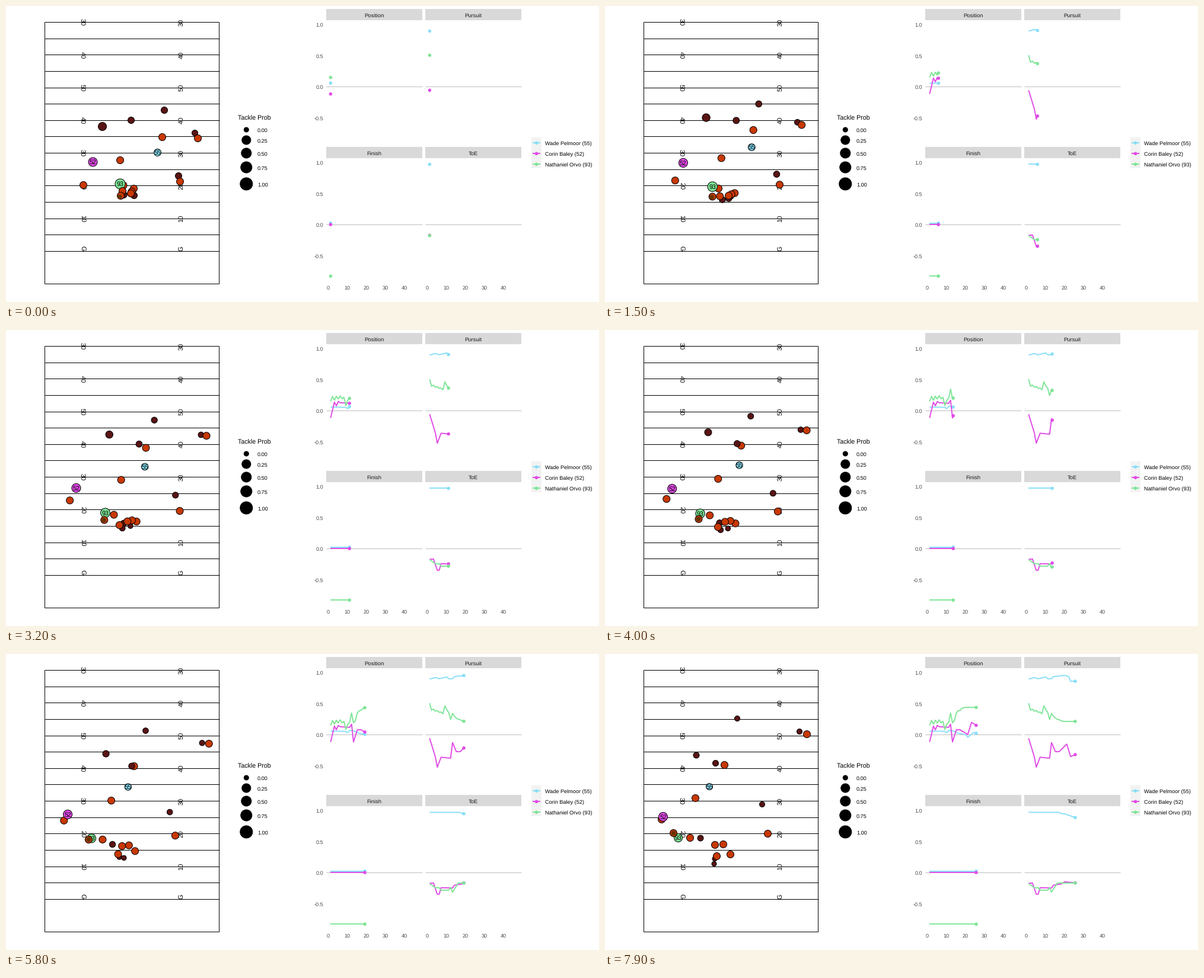
A matplotlib script for the animation above (8 s loop, 1000 by 500 pixels).

```python
import numpy as np
import matplotlib.pyplot as plt
from matplotlib.animation import FuncAnimation
from matplotlib.patches import Circle, Rectangle

W, H, DPI = 1000, 500, 100
FRAMES, INTERVAL = 80, 100
PT = 72 / DPI
plt.rcParams.update({"font.family": "Liberation Sans", "text.hinting": "none"})

BLUE, PINK, GREEN = "#87dff7", "#e04ae6", "#7ee596"
MAROON, ORANGE, BALL = "#5a1414", "#c83803", "#663300"

fig = plt.figure(figsize=(W / DPI, H / DPI), dpi=DPI, facecolor="white")
ax = fig.add_axes([0, 0, 1, 1])
ax.set(xlim=(0, W), ylim=(H, 0))
ax.axis("off")


def text(x, y, s, size=9.2, ha="left", color="black", z=2):
    """Text whose capitals are centred on y."""
    return ax.text(x, y + 0.36 * size, s, fontsize=size * PT, ha=ha,
                   va="baseline", color=color, zorder=z)


def line(xs, ys, color="black", width=1.0, z=1):
    return ax.plot(xs, ys, color=color, lw=width * PT, zorder=z,
                   solid_capstyle="butt", solid_joinstyle="round")[0]


def box(x, y, w, h, color):
    ax.add_patch(Rectangle((x, y), w, h, fc=color, ec="none", zorder=0))


def disc(x, y, d, color, edge="black", z=3):
    return ax.add_patch(Circle((x, y), (d - 1) / 2, fc=color, ec=edge,
                               lw=PT, zorder=z))


# ---- field: a line every five yards, a number every ten ----
LEFT, RIGHT, TOP, GAP = 65, 359, 27, 27.63
ax.add_patch(Rectangle((LEFT, TOP), RIGHT - LEFT, 16 * GAP, fc="none",
                       ec="black", lw=PT, zorder=1))
for k in range(1, 15):
    y = round(TOP + GAP * k)
    line([LEFT, RIGHT + 1], [y, y])
for k, mark in enumerate(["30", "40", "50", "40", "30", "20", "10", "G"]):
    y = TOP + 2 * GAP * k - (5 if mark == "G" else 0)
    for x, turn in ((129, -90), (295.5, 90)):
        ax.text(x, y + 0.5, mark, fontsize=11 * PT, rotation=turn,
                ha="center", va="center", zorder=1)

# ---- size legend ----
text(391, 189.5, "Tackle Prob", 10.6)
for k, (y, d) in enumerate([(209, 9), (226.5, 16), (248.5, 18),
                            (272.5, 20), (300.5, 22)]):
    disc(405.3, y, d, "black")
    text(424, y + 1, f"{k / 4:.2f}")

# ---- chart panels ----
UNIT_X, UNIT_Y = 3.216, 105.2
PANELS = {"Position": (540, 5), "Pursuit": (707, 5),
          "Finish": (540, 238), "ToE": (707, 238)}

for name, (px, py) in PANELS.items():
    box(px, py, 162, 19, "#d9d9d9")
    text(px + 81, py + 10.5, name, 9.4, "center", "#1a1a1a")
    zero = py + 131
    line([px, px + 162], [zero, zero], "#bebebe")
    if px == 540:
        for v in (1, 0.5, 0, -0.5):
            text(535, zero + 1 - v * UNIT_Y, f"{v:.1f}", 9.2, "right",
                 "#4d4d4d")
    if py == 238:
        for v in range(0, 50, 10):
            text(px + 3.5 + v * UNIT_X, 476, str(v), 9.2, "center", "#4d4d4d")

# ---- player legend ----
box(886, 222, 17, 52, "#f2f2f2")
for k, (color, name) in enumerate([(BLUE, "Wade Pelmoor (55)"),
                                   (PINK, "Corin Baley (52)"),
                                   (GREEN, "Nathaniel Orvo (93)")]):
    y = 231 + 18 * k
    line([888, 901], [y, y], color, 2)
    disc(894.5, y + 0.3, 5.5, color, color)
    text(909, y + 1, name)

# ---- revealed curves ----
STEPS = np.arange(1, 27)
curves = []


def curve(panel, color, *knots, wobble=0):
    """Straight runs between (step, value) knots plus a fading zigzag."""
    px, py = PANELS[panel]
    values = np.interp(STEPS, *zip(*knots))
    values += wobble * (-1.0) ** STEPS * np.exp(-STEPS / 8)
    xs = px + 7.4 + UNIT_X * (STEPS - 1)
    ys = py + 131.5 - UNIT_Y * values
    z = 3 + len(curves) / 100
    curves.append((xs, ys, line([], [], color, 1.9, z),
                   disc(xs[0], ys[0], 5.5, color, color, z)))


curve("Position", BLUE, (1, .06), (9, .055), (10, .035), (11, .07), (13, .065),
      (16, .025), (20, 0), (21, -.04), (24, .035), (26, .02))
curve("Position", PINK, (1, -.115), (3, .14), (4, .08), (5, .15), (6, .13),
      (11, .12), (12, .17), (13, -.115), (15, .08), (17, .08), (21, .005),
      (23, .2), (26, .14))
curve("Position", GREEN, (1, .19), (6, .22), (8, .2), (9, .1), (11, .215),
      (12, .34), (13, .2), (14, .22), (15, .36), (19, .44), wobble=.045)

curve("Pursuit", BLUE, (1, .895), (4, .92), (6, .9), (10, .93), (11, .9),
      (13, .9), (14, .935), (20, .955), (22, .935), (23, .86))
curve("Pursuit", PINK, (1, -.055), (4, -.355), (5, -.52), (7, -.36),
      (12, -.375), (13, -.125), (15, -.27), (17, -.27), (21, -.15),
      (23, -.35), (26, -.31))
curve("Pursuit", GREEN, (1, .49), (2, .41), (6, .37), (8, .345), (9, .46),
      (11, .355), (12, .25), (13, .34), (15, .265), (19, .215), wobble=-.02)

curve("Finish", BLUE, (1, .025))
curve("Finish", PINK, (1, .003))
curve("Finish", GREEN, (1, -.825))

curve("ToE", BLUE, (1, .97), (17, .97), (18, .95), (20, .945), (26, .88))
curve("ToE", PINK, (1, -.17), (3, -.165), (5, -.345), (6, -.345), (7, -.24),
      (13, -.245), (14, -.2), (18, -.18), (20, -.145), (26, -.165))
curve("ToE", GREEN, (1, -.175), (4, -.24), (6, -.24), (7, -.28), (11, -.28),
      (12, -.24), (13, -.31), (16, -.165))

# ---- players, in drawing order ----
players = []


def player(color, start, mid, end, size=(13, 13), label=None, edge="black"):
    """A run along one arc through three places; size is first and last."""
    z = 5 + len(players) / 100
    mark = disc(*start, size[0], color, edge, z)
    tag = text(*start, label, 10.6, "center", z=z + .005) if label else None
    players.append((np.array([start, mid, end]), size, mark, tag))


def defender(*run):
    player(MAROON, *run)


def attacker(*run):
    player(ORANGE, *run)


defender((267, 176), (246, 146), (223, 109), (12, 10))
defender((318.5, 214.5), (330, 169), (328, 131), (11, 10))
defender((162.5, 203.5), (174, 173), (154, 171), (15, 11))
defender((291, 287), (283.5, 276), (265, 254), (12, 10))
defender((216, 320), (193.5, 326), (161, 311), (12, 11))
defender((198.5, 319), (195, 337.5), (185, 346), (12, 9))
defender((212, 313), (207.5, 335), (184, 354.5), (10, 9))

attacker((323.5, 223.5), (340, 170), (340.5, 135.5))
attacker((263.5, 221.5), (230, 195.5), (201.5, 187.5))
defender((211, 193), (223, 192), (186.5, 184.5), (12, 11))
attacker((192.5, 260.5), (191, 251.5), (152.5, 243.5))
attacker((130.5, 302.5), (104, 285.5), (95.5, 279.5))
attacker((293.5, 296.5), (291.5, 306.5), (274.5, 303.5))
attacker((198, 303), (177, 313), (143.5, 310.5))
attacker((215.5, 308.5), (220, 326.5), (211.5, 338.5))
attacker((212, 313.5), (211.5, 322.5), (199.5, 321.5))
attacker((210.5, 316.5), (202.5, 324), (185.5, 322.5))

player(BLUE, (255.5, 247.5), (227, 228.5), (176, 224), (13, 12), "55")
player(PINK, (146.5, 263.5), (113.5, 268), (98, 275), (16, 16), "52")
player(GREEN, (192.5, 300.5), (161, 310), (123.5, 310.5), (18, 15), "93")

attacker((196.5, 312.5), (190.5, 332.5), (188.5, 341.5))
attacker((193.5, 320.5), (158.5, 319.5), (115.5, 302.5))
player(BALL, (191.5, 322.5), (158, 319.5), (115.5, 302.5), (9, 9),
       edge="none")


def draw(f):
    step = 0.309 * f
    n = int(step) + 1
    for xs, ys, path, dot in curves:
        x = xs[0] + UNIT_X * step
        y = np.interp(x, xs, ys)
        path.set_data(np.append(xs[:n], x), np.append(ys[:n], y))
        dot.center = (x, y)

    u = f / (FRAMES - 1)
    arc = np.array([(1 - u) * (1 - 2 * u), 4 * u * (1 - u), u * (2 * u - 1)])
    for run, (d0, d1), mark, tag in players:
        x, y = arc @ run
        mark.center = (x, y)
        mark.set_radius((d0 + (d1 - d0) * u - 1) / 2)
        if tag:
            tag.set_position((x, y + 3.8))
    return []


anim = FuncAnimation(fig, draw, frames=FRAMES, interval=INTERVAL,
                     init_func=lambda: draw(0), repeat=True, repeat_delay=0)
plt.show()
```
